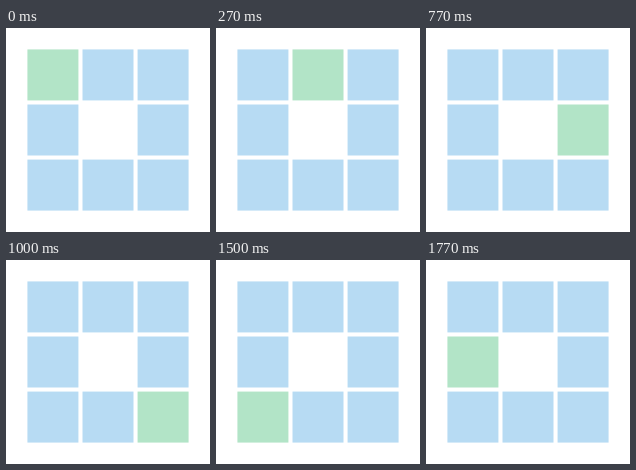
An HTML page with a canvas for the animation above (2 s loop, 204 by 204 pixels).

```html
<!DOCTYPE html>
<html lang="en">
<head>
<meta charset="utf-8">
<title>Loading squares</title>
<style>
  html, body { margin: 0; width: 100%; height: 100%; overflow: hidden; background: #fff; }
  canvas { display: block; width: 204px; height: 204px; }
</style>
</head>
<body>
<canvas id="stage" width="204" height="204"></canvas>
<script>
  const SIZE = 204, LOOP = 2000;
  const UNIT = SIZE / 100;
  const SIDE = 25, PITCH = 27, START = 10.5;
  const BLUE = '#b7dbf3', GREEN = '#b2e4c7';

  // Clockwise from the top left: column, row
  const ring = [[0, 0], [1, 0], [2, 0], [2, 1], [2, 2], [1, 2], [0, 2], [0, 1]];
  const starts = [0, 270, 500, 770, 1000, 1270, 1500, 1770];

  const ctx = document.getElementById('stage').getContext('2d');

  function draw(time) {
    const active = starts.filter(s => s <= time).length - 1;
    ctx.setTransform(1, 0, 0, 1, 0, 0);
    ctx.fillStyle = '#fff';
    ctx.fillRect(0, 0, SIZE, SIZE);
    ctx.scale(UNIT, UNIT);
    ring.forEach(([col, row], i) => {
      ctx.fillStyle = i === active ? GREEN : BLUE;
      ctx.fillRect(START + col * PITCH, START + row * PITCH, SIDE, SIDE);
    });
  }

  const origin = performance.now();
  function tick() {
    draw((performance.now() - origin) % LOOP);
    requestAnimationFrame(tick);
  }
  tick();
</script>
</body>
</html>
```
